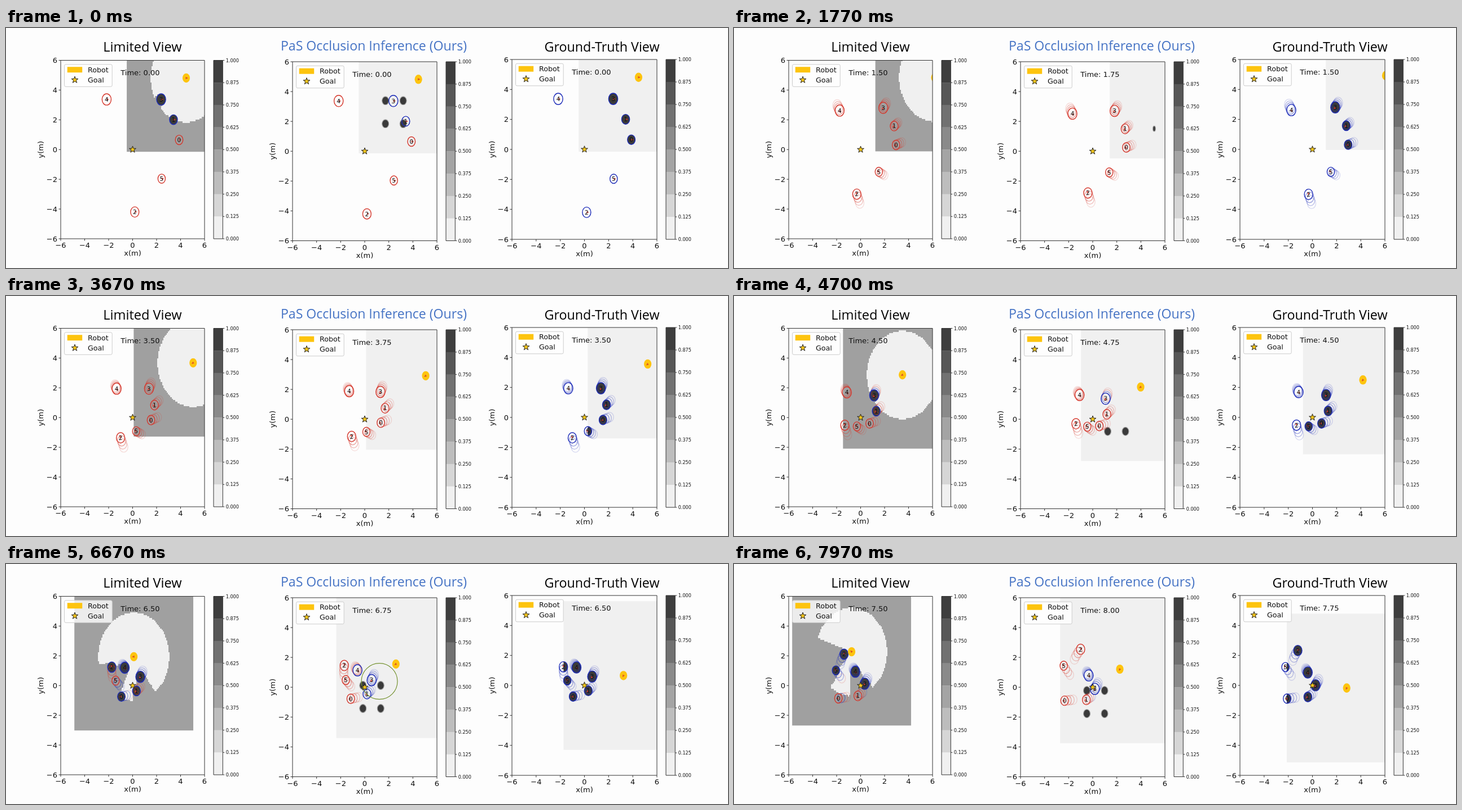
An HTML page for the animation above (8 s loop, 1280x427 px).

```html
<!DOCTYPE html>
<html lang="en">
<head>
<meta charset="utf-8">
<title>Occlusion inference comparison</title>
<style>
  html, body { margin: 0; width: 100%; height: 100%; overflow: hidden; background: #fdfdfd; }
  svg { display: block; width: 100%; height: 100%; }
  text { font-family: "DejaVu Sans", sans-serif; font-size: 13px; fill: #111; }
  .title { font-family: "Open Sans", "Noto Sans", sans-serif; text-anchor: middle; }
  .mid { text-anchor: middle; }
  .end { text-anchor: end; }
  .key { font-size: 12.7px; }
  .bar { font-size: 8.1px; }
  .id { font-size: 10.5px; text-anchor: middle; }
  .axis { fill: none; stroke: #333; stroke-width: 1; }
  .star { fill: #f5c518; stroke: #222; stroke-width: 1; }
  .cells { shape-rendering: crispEdges; }
</style>
</head>
<body>
<svg id="stage" viewBox="0 0 1280 427"></svg>
<script>
const LOOP = 8000, STEP = 250, DT = 0.25;
const RANGE = 2.97, HALF = 4.96, CELL = 0.1;
const RED = '#d5372c', BLUE = '#1c2bb8', GOLD = '#fdc40f';
const FREE = '#f0f0f0', UNKNOWN = '#a0a0a0', OCCUPIED = '#3a3a3a';

// Every path is a smooth curve through five points at these times
const KEYS = [0, 2.25, 4.5, 6.5, 8];
const WALKERS = [
  { r: .32, path: [[3.88, .65], [2.45, .14], [.75, -.4], [-.94, -.74], [-2.34, -.9]] },
  { r: .33, path: [[3.41, 2.01], [2.46, 1.33], [1.3, .43], [.32, -.36], [-.53, -.84]] },
  { r: .35, path: [[.18, -4.2], [-.57, -2.39], [-1.32, -.52], [-1.74, 1.24], [-1.01, 2.54]] },
  { r: .38, path: [[2.38, 3.37], [1.67, 2.5], [1.13, 1.49], [.64, .59], [.17, -.11]] },
  { r: .38, path: [[-2.17, 3.37], [-1.57, 2.32], [-1.15, 1.69], [-.66, 1.2], [-.34, .79]] },
  { r: .31, path: [[2.42, -1.96], [1.07, -1.27], [-.31, -.6], [-1.42, .33], [-2.41, 1.44]] }
];

const PANELS = [
  { kind: 'limited', title: 'Limited View', tx: 242, ty: 42, size: 23.6, ink: '#000',
    x: 97, y: 57.5, w: 255, h: 317.5, lag: -.55, last: 30,
    path: [[4.47, 4.81], [6.28, 4.6], [3.49, 2.87], [.1, 1.94], [-.88, 2.72]] },
  { kind: 'inferred', title: 'PaS Occlusion Inference (Ours)', tx: 652, ty: 40, size: 23.1, ink: '#4472c4',
    x: 508, y: 60, w: 256, h: 318.5, lag: .45, last: 32,
    path: [[4.46, 4.82], [6.45, 4.24], [4.2, 2.3], [2.72, 1.63], [2.25, 1.21]] },
  { kind: 'truth', title: 'Ground-Truth View', tx: 1056.5, ty: 42, size: 23.3, ink: '#000',
    x: 897, y: 56, w: 257, h: 320, lag: -.55, last: 31,
    path: [[4.48, 4.81], [6.23, 4.65], [4.18, 2.5], [3.23, .66], [2.78, -.3]] }
];

const f = v => v.toFixed(2);
const clamp = (v, lo, hi) => Math.max(lo, Math.min(hi, v));

function curve(path, axis, t) {
  const v = k => path[k][axis], end = KEYS.length - 1;
  const rate = (a, b) => (v(b) - v(a)) / (KEYS[b] - KEYS[a]);
  const slope = k => {
    if (k === 0) return 2 * rate(0, 1) - rate(0, 2);
    if (k === end) return 2 * rate(end - 1, end) - rate(end - 2, end);
    return rate(k - 1, k + 1);
  };
  let i = 0;
  while (i < end - 1 && t > KEYS[i + 1]) i++;
  const h = KEYS[i + 1] - KEYS[i], u = (t - KEYS[i]) / h, s = u * u * (3 - 2 * u);
  return v(i) * (1 - s) + v(i + 1) * s
    + h * u * (1 - u) * ((1 - u) * slope(i) - u * slope(i + 1));
}

const at = (path, t) => ({ x: curve(path, 0, t), y: curve(path, 1, t) });
const walkersAt = t => WALKERS.map(w => ({ ...at(w.path, t), r: w.r }));

function heading(path, t) {
  if (t === 0) return 0;
  const a = at(path, t - DT), b = at(path, t);
  return Math.atan2(b.y - a.y, b.x - a.x);
}

// Sight cones seen from the robot
function cones(robot, walkers, scale) {
  return walkers.map(w => {
    const dx = w.x - robot.x, dy = w.y - robot.y, d = Math.hypot(dx, dy);
    return { d, angle: Math.atan2(dy, dx), half: Math.asin(Math.min(1, w.r * scale / d)) };
  });
}

function blocked(list, d, angle) {
  return list.some(c => {
    if (d <= c.d + .01) return false;
    const diff = Math.abs(angle - c.angle);
    return Math.min(diff, 2 * Math.PI - diff) < c.half;
  });
}

function seen(robot, walkers) {
  const list = cones(robot, walkers, .8);
  return list.map((c, i) => c.d - walkers[i].r < 2.95 && !blocked(list, c.d, c.angle));
}

function scales(p) {
  const sx = p.w / 12, sy = p.h / 12;
  return { sx, sy, X: v => p.x + (v + 6) * sx, Y: v => p.y + (6 - v) * sy };
}

function ellipse(x, y, rx, ry, attrs) {
  return `<ellipse cx="${f(x)}" cy="${f(y)}" rx="${f(rx)}" ry="${f(ry)}" ${attrs}/>`;
}

// Circle in plot units
const ring = (s, c, r, attrs) => ellipse(s.X(c.x), s.Y(c.y), r * s.sx, r * s.sy, attrs);

function star(x, y) {
  let pts = '';
  for (let i = 0; i < 10; i++) {
    const r = i % 2 ? 2.5 : 6.2, a = Math.PI * (i / 5 - .5);
    pts += `${f(x + r * Math.cos(a))},${f(y + r * Math.sin(a))} `;
  }
  return `<polygon class="star" points="${pts}"/>`;
}

function arrow(x, y, angle, reach) {
  const deg = -angle * 180 / Math.PI;
  return `<path transform="translate(${f(x)} ${f(y)}) rotate(${f(deg)})" d="M${reach - 3},-2L${reach + 1.5},0L${reach - 3},2Z" fill="#d8392b" opacity=".85"/>`;
}

function frame(p, n) {
  const { X, Y } = scales(p), right = p.x + p.w, bottom = p.y + p.h;
  const bx = right + 16, bw = 16.3, bh = p.h / 8;
  let marks = '', labels = '', bar = '';
  for (let v = -6; v <= 6; v += 2) {
    const name = String(v).replace('-', '\u2212');
    marks += `M${f(X(v))},${bottom}v3.5M${p.x},${f(Y(v))}h-3.5`;
    labels += `<text class="mid" x="${f(X(v))}" y="${bottom + 16}">${name}</text>`
      + `<text class="end" x="${p.x - 6}" y="${f(Y(v) + 4.7)}">${name}</text>`;
  }
  for (let i = 0; i <= 8; i++) {
    const y = p.y + i * bh, g = 62 + i * 25.4;
    if (i < 8) bar += `<rect x="${bx}" y="${f(y)}" width="${bw}" height="${f(bh + .3)}" fill="rgb(${g},${g},${g})"/>`;
    marks += `M${bx + bw},${f(y)}h3`;
    bar += `<text class="bar" x="${bx + 21.7}" y="${f(y + 3)}">${(1 - i / 8).toFixed(3)}</text>`;
  }
  return `<clipPath id="clip${n}"><rect x="${p.x}" y="${p.y}" width="${p.w}" height="${p.h}"/></clipPath>
    <text class="title" x="${p.tx}" y="${p.ty}" style="font-size:${p.size}px;fill:${p.ink}">${p.title}</text>
    <g id="plot${n}" clip-path="url(#clip${n})"></g>
    ${bar}${labels}
    <path class="axis" d="${marks}M${p.x},${p.y}h${p.w}v${p.h}h${-p.w}zM${bx},${p.y}h${bw}v${p.h}h${-bw}z"/>
    <text class="mid" x="${p.x + p.w / 2}" y="${bottom + 30}">x(m)</text>
    <text class="mid" transform="translate(${p.x - 31} ${p.y + p.h / 2}) rotate(-90)">y(m)</text>
    <rect x="${p.x + 6.5}" y="${p.y + 7.3}" width="84.7" height="39.5" rx="2.5" fill="#fff" fill-opacity=".8" stroke="#ccc"/>
    <rect x="${p.x + 11.7}" y="${p.y + 11.7}" width="26.5" height="10" fill="${GOLD}"/>
    ${star(p.x + 25, p.y + 34.8)}
    <text class="key" x="${p.x + 48}" y="${p.y + 21.2}">Robot</text>
    <text class="key" x="${p.x + 48}" y="${p.y + 39}">Goal</text>
    <text id="time${n}" x="${p.x + 106.3}" y="${p.y + 26.5}"></text>`;
}

// Runs of cells in view of the robot, row by row
function freeCells(s, robot, walkers) {
  const list = cones(robot, walkers, 1), n = Math.ceil(RANGE / CELL);
  let d = '';
  for (let j = -n; j < n; j++) {
    let start = null;
    for (let i = -n; i <= n; i++) {
      const dx = (i + .5) * CELL, dy = (j + .5) * CELL, dist = Math.hypot(dx, dy);
      const open = dist < RANGE && !blocked(list, dist, Math.atan2(dy, dx));
      if (open && start === null) start = i;
      if (!open && start !== null) {
        const x = s.X(robot.x + start * CELL), y = s.Y(robot.y + (j + 1) * CELL);
        const w = (i - start) * CELL * s.sx;
        d += `M${f(x)},${f(y)}h${f(w)}v${f(CELL * s.sy + .15)}h${f(-w)}z`;
        start = null;
      }
    }
  }
  return `<path class="cells" d="${d}" fill="${FREE}"/>`;
}

// Two rows of guesses beside the robot: they fade early, the lower row returns first
function guesses(s, robot, t) {
  let out = '';
  for (let row = 0; row < 2; row++) {
    const full = clamp(Math.max(1 - t, t - 5.5 + row * 1.75), 0, 1);
    for (let col = 0; col < 2; col++) {
      const faint = row && col && t < 3 ? .65 : 0;
      const k = Math.max(full, faint), slim = full < faint ? .6 : 1;
      if (k) {
        out += ellipse(s.X(robot.x) - 58.5 + col * 31.5, s.Y(robot.y) + 38 + row * 41,
          6 * k * slim, 7.4 * k, `fill="${OCCUPIED}" stroke="#a8a8a8" stroke-width="1.2"`);
      }
    }
  }
  return out;
}

function draw(p, n, step) {
  const s = scales(p), t = step * DT, robot = at(p.path, t), now = walkersAt(t);
  const box = `x="${f(s.X(robot.x - HALF))}" y="${f(s.Y(robot.y + HALF))}"`
    + ` width="${f(2 * HALF * s.sx)}" height="${f(2 * HALF * s.sy)}"`;
  const visible = seen(robot, now);
  let out = `<rect ${box} fill="${p.kind === 'limited' ? UNKNOWN : FREE}"/>`;
  if (p.kind === 'limited') out += freeCells(s, robot, now);
  if (p.kind === 'inferred') out += guesses(s, robot, t);
  else {
    out += `<clipPath id="grid${n}"><rect ${box}/></clipPath><g clip-path="url(#grid${n})">`;
    now.forEach((w, i) => {
      if (p.kind === 'truth' || visible[i]) out += ring(s, w, w.r, `fill="${OCCUPIED}"`);
    });
    out += '</g>';
  }

  // Fading trail of the last steps, then the present
  for (let back = Math.min(3, step); back >= 0; back--) {
    const past = (step - back) * DT, ws = walkersAt(past), mask = seen(at(p.path, past), ws);
    const alpha = back ? .55 - back * .13 : 1;
    ws.forEach((w, i) => {
      const ink = p.kind === 'truth' || mask[i] ? BLUE : RED;
      out += ring(s, w, w.r, `fill="none" stroke="${ink}" stroke-width="1.4" opacity="${alpha}"`);
    });
  }

  out += ring(s, robot, .31, `fill="${GOLD}"`)
    + arrow(s.X(robot.x), s.Y(robot.y), heading(p.path, t), 2);
  now.forEach((w, i) => {
    const x = s.X(w.x), y = s.Y(w.y);
    out += arrow(x, y, heading(WALKERS[i].path, t), 3)
      + `<text class="id" x="${f(x)}" y="${f(y + 3.8)}">${i}</text>`;
  });
  if (p.kind === 'inferred' && t >= 6.5 && t <= 7) {
    out += ellipse(662, 208.7, 32, 32, 'fill="none" stroke="#74922f" stroke-width="1.2"');
  }
  out += star(s.X(0), s.Y(0));
  document.getElementById('plot' + n).innerHTML = out;
  document.getElementById('time' + n).textContent = 'Time: ' + t.toFixed(2);
}

document.getElementById('stage').innerHTML = PANELS.map(frame).join('');
const shown = PANELS.map(() => -1);
const begin = performance.now();

function tick() {
  const ms = (performance.now() - begin) % LOOP;
  PANELS.forEach((p, n) => {
    const step = clamp(Math.floor(ms / STEP + p.lag), 0, p.last);
    if (step !== shown[n]) draw(p, n, shown[n] = step);
  });
  requestAnimationFrame(tick);
}
tick();
</script>
</body>
</html>
```
